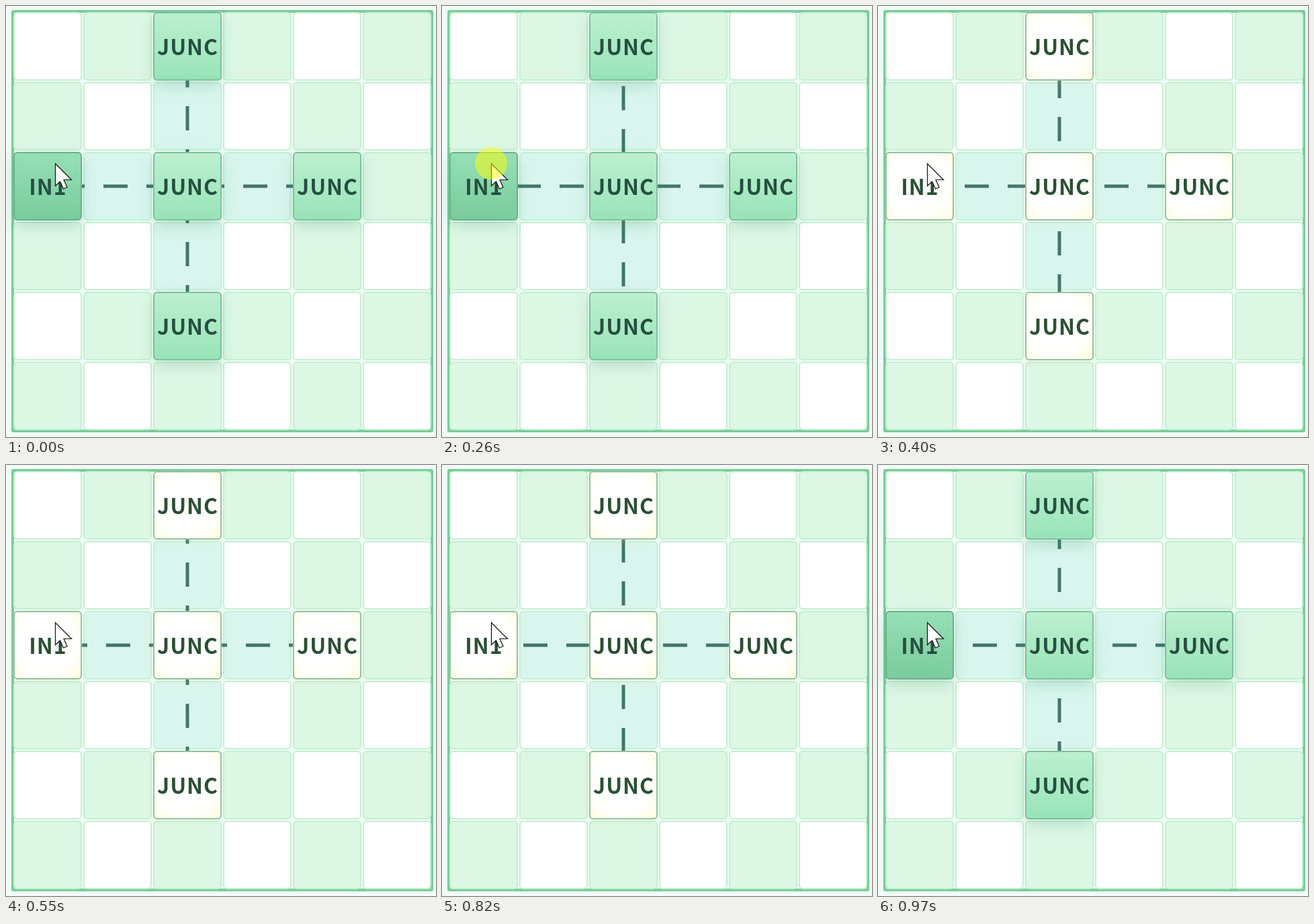
Write an HTML page with a canvas that moves like this. It is 640 px wide and 641 px high and loops after 1000 ms.

```html
<!DOCTYPE html>
<html lang="en">
<head>
<meta charset="utf-8">
<title>Signal board</title>
<style>
html, body { margin: 0; width: 100%; height: 100%; overflow: hidden; background: #f0fcf5; }
canvas { display: block; }
</style>
</head>
<body>
<canvas id="board" width="640" height="641"></canvas>
<script>
const ctx = document.getElementById('board').getContext('2d');
const LOOP = 1000, SIZE = 100, PITCH = 104, LEFT = 12, TOP = 10;

const tiles = [
  { col: 2, row: 0, label: 'JUNC' },
  { col: 0, row: 2, label: 'IN1', input: true },
  { col: 2, row: 2, label: 'JUNC' },
  { col: 4, row: 2, label: 'JUNC' },
  { col: 2, row: 4, label: 'JUNC' }
];
// Wires as [from col, from row, to col, to row]
const wires = [[0, 2, 2, 2], [2, 2, 4, 2], [2, 2, 2, 0], [2, 2, 2, 4]];
const wireCells = new Set(wires.map(([a, b, c, d]) => (a + c) / 2 + ',' + (b + d) / 2));

// Step times of the slower opening; afterwards every 30 ms
const opening = [0, 30, 70, 110, 150, 190, 230, 260, 300, 340, 370];

const xOf = col => LEFT + col * PITCH;
const yOf = row => TOP + row * PITCH;

function stepTime(t) {
  if (t >= 370) return 370 + Math.floor((t - 370) / 30) * 30;
  return opening.filter(s => s <= t).pop();
}

function dashShift(t) {
  if (t < 260) return t * 30 / 260;
  if (t < 370) return 30 + (t - 260) * 14 / 110;
  return 44 + (t - 370) * 4 / 30;
}

function box(col, row, fill, stroke) {
  ctx.beginPath();
  ctx.roundRect(xOf(col), yOf(row), SIZE, SIZE, 5);
  ctx.fillStyle = fill;
  ctx.fill();
  ctx.shadowColor = 'transparent';
  ctx.strokeStyle = stroke;
  ctx.lineWidth = 2;
  ctx.stroke();
}

function drawGrid() {
  ctx.fillStyle = '#f0fcf5';
  ctx.fillRect(0, 0, 640, 641);
  ctx.strokeStyle = '#7acc9c';
  ctx.lineWidth = 4;
  ctx.beginPath();
  ctx.roundRect(10, 8, 624, 624, 1);
  ctx.stroke();
  for (let row = 0; row < 6; row++) {
    for (let col = 0; col < 6; col++) {
      const wired = wireCells.has(col + ',' + row);
      const fill = wired ? '#d9f6ee' : (row + col) % 2 ? '#ddf7e5' : '#ffffff';
      box(col, row, fill, wired ? '#c3f0db' : '#c2f0d1');
    }
  }
}

function drawWires(shift) {
  ctx.save();
  ctx.strokeStyle = '#44756b';
  ctx.lineWidth = 5;
  ctx.setLineDash([36, 28]);
  ctx.lineDashOffset = -(19 + shift);
  for (const [a, b, c, d] of wires) {
    ctx.beginPath();
    ctx.moveTo(xOf(a) + 50, yOf(b) + 50);
    ctx.lineTo(xOf(c) + 50, yOf(d) + 50);
    ctx.stroke();
  }
  ctx.restore();
}

function tileFill(x, y, input, lit) {
  let g;
  if (lit) {
    g = ctx.createRadialGradient(x + 46, y + 46, 30, x + 46, y + 46, 76);
    g.addColorStop(0, '#ffffff');
    g.addColorStop(0.4, '#fffffb');
    g.addColorStop(1, '#fffadc');
  } else {
    g = ctx.createLinearGradient(0, y, 0, y + SIZE);
    g.addColorStop(0, input ? '#96dfb6' : '#bcf0d0');
    g.addColorStop(1, input ? '#79cc9d' : '#98e3b9');
  }
  return g;
}

function drawTile({ col, row, label, input }, lit) {
  const x = xOf(col), y = yOf(row);
  ctx.save();
  ctx.shadowColor = lit ? 'rgba(225, 215, 130, 0.16)' : 'rgba(45, 140, 95, 0.24)';
  ctx.shadowOffsetY = lit ? 4 : 8;
  ctx.shadowBlur = lit ? 16 : 24;
  box(col, row, tileFill(x, y, input, lit), lit ? '#92c2a7' : input ? '#6bb08c' : '#7ec19d');
  ctx.restore();
  ctx.fillStyle = lit ? '#295133' : '#254f40';
  ctx.fillText(label, x + 50.5, y + 62.5);
}

function drawCursor() {
  ctx.beginPath();
  [[73.5, 234.5], [73.5, 267.5], [80.5, 261], [85.5, 272], [91, 269.5], [86, 258.5], [97.5, 258.5]]
    .forEach(([x, y]) => ctx.lineTo(x, y));
  ctx.closePath();
  ctx.fillStyle = '#ffffff';
  ctx.fill();
  ctx.strokeStyle = '#101010';
  ctx.lineWidth = 1.2;
  ctx.stroke();
}

function drawClick() {
  ctx.fillStyle = 'rgba(255, 255, 0, 0.5)';
  ctx.beginPath();
  ctx.arc(73, 234, 24, 0, Math.PI * 2);
  ctx.fill();
}

function draw(now) {
  const t = stepTime(now % LOOP);
  const lit = t >= 400 && t < 970;
  drawGrid();
  drawWires(dashShift(t));
  ctx.font = 'bold 32px "Noto Sans CJK JP", "Noto Sans CJK SC", "Noto Sans CJK", sans-serif';
  ctx.letterSpacing = '1px';
  ctx.textAlign = 'center';
  tiles.forEach(tile => drawTile(tile, lit));
  drawCursor();
  if (t >= 230 && t < 340) drawClick();
}

let start;
function tick(now) {
  start ??= now;
  draw(Math.max(0, now - start));
  requestAnimationFrame(tick);
}
requestAnimationFrame(tick);
</script>
</body>
</html>
```
